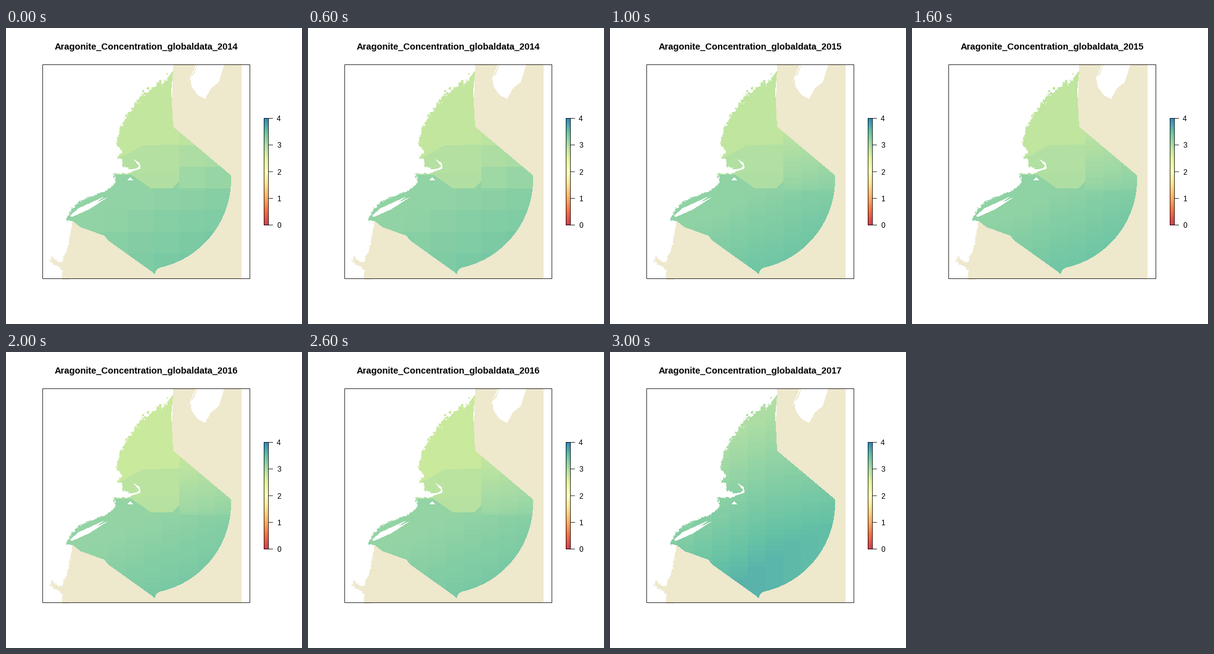
A matplotlib script that plays this animation: 480 by 480 pixels, repeating every 4 s.

```python
import numpy as np
import matplotlib.pyplot as plt
from matplotlib.animation import FuncAnimation
from matplotlib.colors import LinearSegmentedColormap
from matplotlib.patches import Rectangle
from matplotlib.path import Path

SIZE = 480
PT = 0.9  # points per pixel at 80 dpi
LINE = 0.8 * PT
YEARS = range(2014, 2018)
SEABED = np.array([238, 232, 205]) / 255
SPECTRAL = LinearSegmentedColormap.from_list("spectral", [
    "#D53E4F", "#F46D43", "#FDAE61", "#FEE08B", "#FFFFBF",
    "#E6F598", "#ABDDA4", "#66C2A5", "#3288BD"])

X, Y = np.meshgrid(np.arange(SIZE) + 0.5, np.arange(SIZE) + 0.5)

# Key points of each outline; the ragged shoreline comes from seeded noise.
ANGLES = np.linspace(0, np.radians(78), 40)
ARC = list(zip(218 + 147 * np.cos(ANGLES), 245 + 147 * np.sin(ANGLES)))
RIM = [(271, 69), (268, 103), (271, 160), (365, 239)]
SOUTH_EDGE = [(243, 393), (241, 400), (239, 397), (165, 344), (160, 337),
              (121, 323), (108, 313), (97, 313)]
COAST = [(106, 293), (120, 281), (164, 263), (178, 250), (174, 236),
         (197, 236), (203, 233), (190, 224), (188, 213), (178, 211),
         (188, 199), (179, 190), (184, 165), (195, 142), (210, 125),
         (222, 108), (238, 95), (259, 85)]
SURVEY = RIM + ARC + SOUTH_EDGE + COAST
BASIN = [(271, 59), (382, 59), (382, 407), (91, 407), (89, 389), (73, 381),
         (73, 370), (89, 381), (99, 360), (107, 322), (107, 313), (268, 150)]
CAPE = [(194, 230), (212, 228), (216, 224), (207, 213), (217, 219),
        (218, 228), (200, 234)]
LONG_ISLAND = [(103, 305), (118, 292), (160, 273), (146, 283), (166, 274),
               (135, 294), (108, 306)]
ISLET = [(197, 247), (202, 242), (206, 247)]
BAY = [(311, 59), (354, 59), (345, 88), (332, 98), (323, 115), (311, 109),
       (301, 95), (299, 81), (305, 74)]
INLET = [(293, 93), (308, 59), (310, 59)]


def inside(outline, x=X, y=Y):
    xy = np.column_stack([x.ravel(), y.ravel()])
    return Path(outline).contains_points(xy).reshape(X.shape)


def build_masks():
    rng = np.random.default_rng(7)

    def noise():
        patches = np.kron(rng.normal(size=(120, 120)), np.ones((4, 4)))
        return patches + 0.6 * rng.normal(size=X.shape)

    shore = (X < 262) & (Y < 312) | (X < 106)
    amount = shore * np.interp(Y, [110, 150], [2.8, 0.8])
    jx, jy = X + amount * noise(), Y + amount * noise()
    survey, basin = inside(SURVEY, jx, jy), inside(BASIN, jx, jy)
    for land in (CAPE, LONG_ISLAND, ISLET):
        survey &= ~inside(land)
    for water in (BAY, INLET):
        basin &= ~inside(water)
    basin &= (X > 266) | (Y > 312)
    return basin, survey


def snap(values, start, step):
    return start + (np.floor((values - start) / step) + 0.5) * step


def stepped_field(north, middle, south, slope, width=29, height=8.8):
    """Three latitude zones; the south and east rise in grid cells."""
    cx, cy = snap(X, 281, width), snap(Y, 190, height)
    upper = np.interp(X, [180, 192, 222, 281], [212, 207, 190, 189])
    shelf = np.interp(X, [203, 235, 270, 281], [238, 260, 260, 248])
    field = south + slope * np.maximum(cy - 260 + 0.5 * (cx - 260), 0)
    east = middle + 0.0034 * (cy - 195) + 0.001 * (cx - 281)
    field = np.where((X >= 281) & (Y < 264), np.minimum(east, field), field)
    bank = middle + 0.03 * (Y > 235)
    field = np.where((X < 281) & (Y < shelf), bank, field)
    return np.where((X < 281) & (Y < upper), north, field)


def gradient_field():
    cx, cy = snap(X, 194, 29), snap(Y, 190, 8.8)
    rise = np.clip((cy - 110 + 0.6 * (cx - 238)) / 240, 0, 1)
    return 2.97 + 0.64 * rise - 0.0009 * np.maximum(cx - 252, 0)


def render(field):
    picture = np.ones((SIZE, SIZE, 3))
    picture[basin_mask] = SEABED
    picture[survey_mask] = SPECTRAL(field[survey_mask] / 4)[:, :3]
    return picture


basin_mask, survey_mask = build_masks()
maps = [render(field) for field in (
    stepped_field(2.79, 2.91, 3.18, 0.0014, width=41.3, height=35),
    stepped_field(2.82, 2.93, 3.20, 0.0018),
    stepped_field(2.74, 2.87, 3.17, 0.0015),
    gradient_field())]

fig = plt.figure(figsize=(6, 6), dpi=80, facecolor="white")
ax = fig.add_axes([0, 0, 1, 1])
ax.axis("off")
map_image = ax.imshow(maps[0], extent=(0, SIZE, SIZE, 0),
                      interpolation="nearest")
ax.imshow(np.linspace(4, 0, 174)[:, None], cmap=SPECTRAL, vmin=0, vmax=4,
          interpolation="nearest", extent=(418, 426, 320, 146))
ax.set(xlim=(0, SIZE), ylim=(SIZE, 0), aspect="auto")


def frame_box(left, top, right, bottom):
    ax.add_patch(Rectangle((left, top), right - left, bottom - top,
                           fill=False, edgecolor="black", linewidth=LINE,
                           joinstyle="miter", snap=False))


frame_box(59.5, 59.5, 395.5, 406.5)
frame_box(418.5, 146.5, 425.5, 319.5)

for value in range(5):
    y = 319.5 - value * 43.25
    ax.plot([425.5, 432.5], [y, y], color="black", linewidth=LINE, snap=False)
    ax.text(439, y + 4.5, str(value), family="Liberation Sans",
            fontsize=12 * PT, va="baseline")

title = ax.text(227.2, 35, "", family="Liberation Sans", weight="bold",
                fontsize=14.6 * PT, ha="center", va="baseline")


def update(i):
    map_image.set_data(maps[i])
    title.set_text(f"Aragonite_Concentration_globaldata_{YEARS[i]}")
    return map_image, title


anim = FuncAnimation(fig, update, frames=len(YEARS), interval=1000,
                     repeat=True, repeat_delay=0)
plt.show()
```
